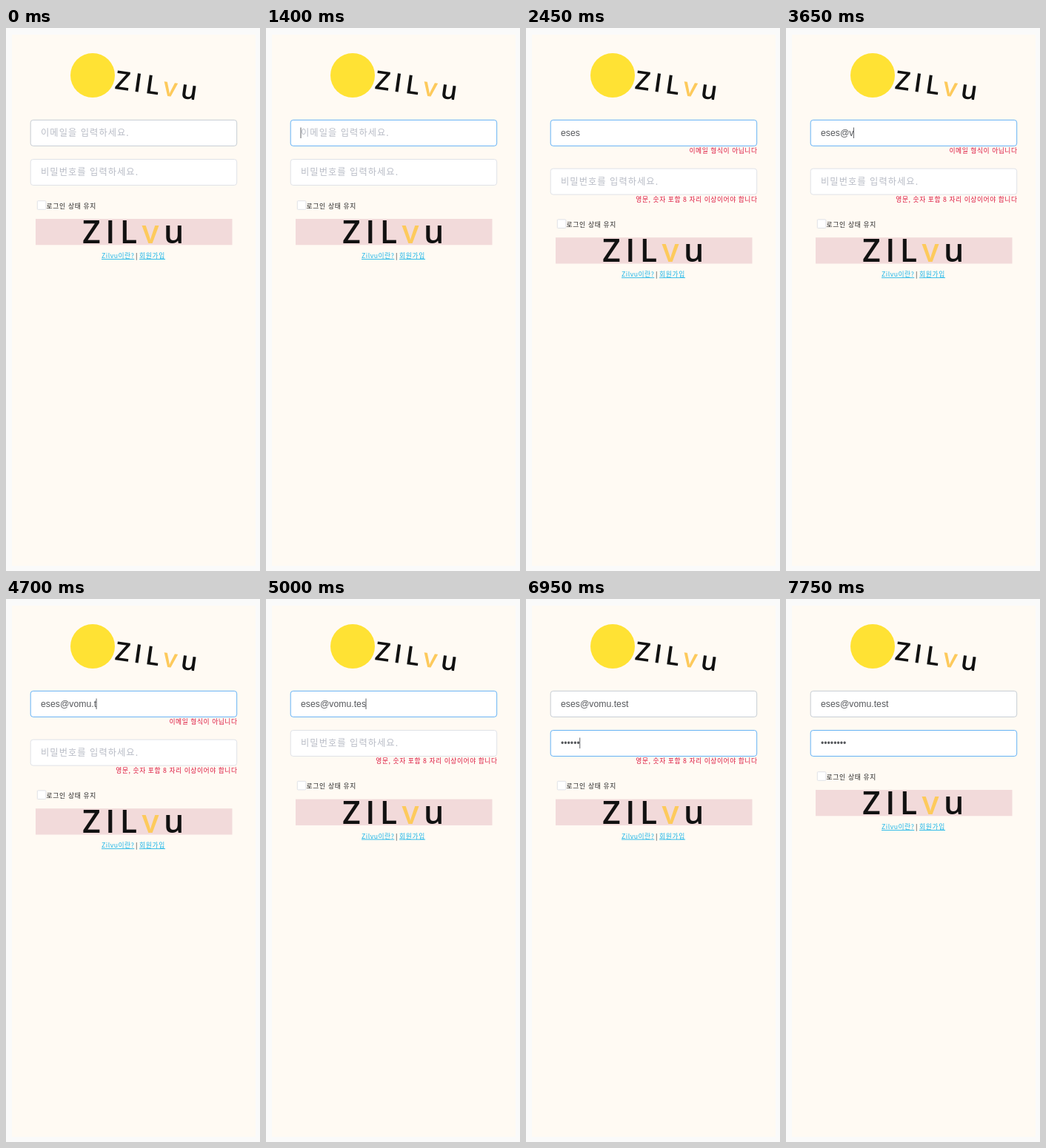
These frames come from a looping animation (343x734 px, 8000 ms). An HTML page:

```html
<!DOCTYPE html>
<html lang="ko">
<head>
<meta charset="utf-8">
<title>Login form</title>
<style>
html, body { margin: 0; width: 100%; height: 100%; overflow: hidden; background: #fafafa; }
svg { display: block; }
text { font: 12.25px "Liberation Sans", Arial, sans-serif; fill: #56585c; }
.hint { font-family: "Noto Sans CJK KR", "Noto Sans CJK", sans-serif; letter-spacing: 1.05px; fill: #b8bcc6; }
.small { font: 8.75px "Noto Sans CJK KR", "Noto Sans CJK", sans-serif; letter-spacing: .7px; fill: #222; }
.error { fill: #dc143c; letter-spacing: .56px; text-anchor: end; }
.link { fill: #19b5e8; text-decoration: underline; }
.word { font: 600 43px "Open Sans", sans-serif; letter-spacing: .15em; fill: #111; }
.word tspan { fill: #fdca5c; }
.box { fill: #fff; stroke: #dcdfe6; stroke-width: .9; }
</style>
</head>
<body>
<svg width="343" height="734" viewBox="0 0 343 734">
  <rect x="8" y="9" width="329" height="718" fill="#fffaf3"/>
  <circle cx="117" cy="64" r="30" fill="#ffe234"/>
  <text class="word" transform="translate(146 82) rotate(8)" style="font-size:35px">ZIL<tspan>v</tspan>u</text>

  <g id="email">
    <rect class="box" x="33.2" y="124.4" width="278.5" height="35" rx="3.5"/>
    <text class="hint" x="47" y="146">이메일을 입력하세요.</text>
    <text class="value" x="47" y="146"></text>
    <rect class="caret" y="134.5" width="1" height="14.5" fill="#606266"/>
    <text class="small error" x="312.6" y="169.2">이메일 형식이 아닙니다</text>
  </g>

  <g id="password">
    <rect class="box" x="33.2" y="177.5" width="278.5" height="35" rx="3.5"/>
    <text class="hint" x="47" y="199">비밀번호를 입력하세요.</text>
    <text class="value" x="47" y="199"></text>
    <rect class="caret" y="187.5" width="1" height="14.5" fill="#606266"/>
    <text class="small error" x="312.6" y="222">영문, 숫자 포함 8 자리 이상이어야 합니다</text>
  </g>

  <g id="footer">
    <rect class="box" x="42.3" y="233.7" width="11.6" height="11.6" rx="1"/>
    <text class="small" x="54.5" y="243.5">로그인 상태 유지</text>
    <rect x="40" y="258" width="265.5" height="35.3" fill="#f2dada"/>
    <text class="word" x="103" y="291">ZIL<tspan>v</tspan>u</text>
    <text class="small link" x="129" y="311" style="letter-spacing:.5px">Zilvu이란?</text>
    <text class="small" x="175" y="311">|</text>
    <text class="small link" x="180" y="311">회원가입</text>
  </g>
</svg>
<script>
const LOOP = 8000, ERROR_HEIGHT = 12.6, FADE = 200;
const ADDRESS = 'eses@vomu.test';
const emailKeys = [1550, 1650, 1750, 1900, 2650, 3650, 3800, 3950, 4100, 4250, 4700, 4850, 5000, 5150];
const passwordKeys = [6100, 6250, 6400, 6550, 6800, 6950, 7100, 7250];
const caretGaps = [[950, 1400], [2450, 2650], [3150, 3650], [5650, 5750], [7750, LOOP]];
const PLAIN = [220, 223, 230], HOVER = [192, 200, 208], FOCUS = [84, 170, 244];

const $ = s => document.querySelector(s);
const field = id => ({
  group: $(id), box: $(id + ' .box'), hint: $(id + ' .hint'),
  value: $(id + ' .value'), caret: $(id + ' .caret'), error: $(id + ' .error')
});
const email = field('#email'), password = field('#password'), footer = $('#footer');

const typed = (keys, t) => keys.filter(k => k <= t).length;
const show = (el, on) => el.setAttribute('visibility', on ? 'visible' : 'hidden');
const shift = (el, y) => el.setAttribute('transform', `translate(0 ${y})`);

function fade(start, t) {
  const p = Math.min(1, Math.max(0, (t - start) / FADE));
  return p < .5 ? 4 * p ** 3 : 1 - 4 * (1 - p) ** 3;
}
const mix = (a, b, p) => `rgb(${a.map((v, i) => v + (b[i] - v) * p)})`;

function drawField(f, text, caretOn, border, invalid) {
  if (f.value.textContent !== text) f.value.textContent = text;
  show(f.hint, !text);
  show(f.caret, caretOn);
  show(f.error, invalid);
  f.caret.setAttribute('x', 46.5 + (text ? f.value.getComputedTextLength() : 0));
  f.box.style.stroke = border;
}

function draw(t) {
  const caretOn = t >= 450 && !caretGaps.some(([a, b]) => t >= a && t < b);
  const onPassword = t >= 5750;
  const emailCount = typed(emailKeys, t), passwordCount = typed(passwordKeys, t);
  const badEmail = emailCount > 0 && emailCount < 13;
  const badPassword = emailCount > 0 && passwordCount < 8;
  const moved = fade(5760, t);
  const emailBorder = onPassword ? mix(FOCUS, HOVER, moved) : mix(HOVER, FOCUS, fade(425, t));

  drawField(email, ADDRESS.slice(0, emailCount), caretOn && !onPassword, emailBorder, badEmail);
  drawField(password, '•'.repeat(passwordCount), caretOn && onPassword, mix(PLAIN, FOCUS, moved), badPassword);
  shift(password.group, badEmail ? ERROR_HEIGHT : 0);
  shift(footer, (badEmail + badPassword) * ERROR_HEIGHT);
}

function tick() {
  draw(performance.now() % LOOP);
  requestAnimationFrame(tick);
}
tick();
</script>
</body>
</html>
```
